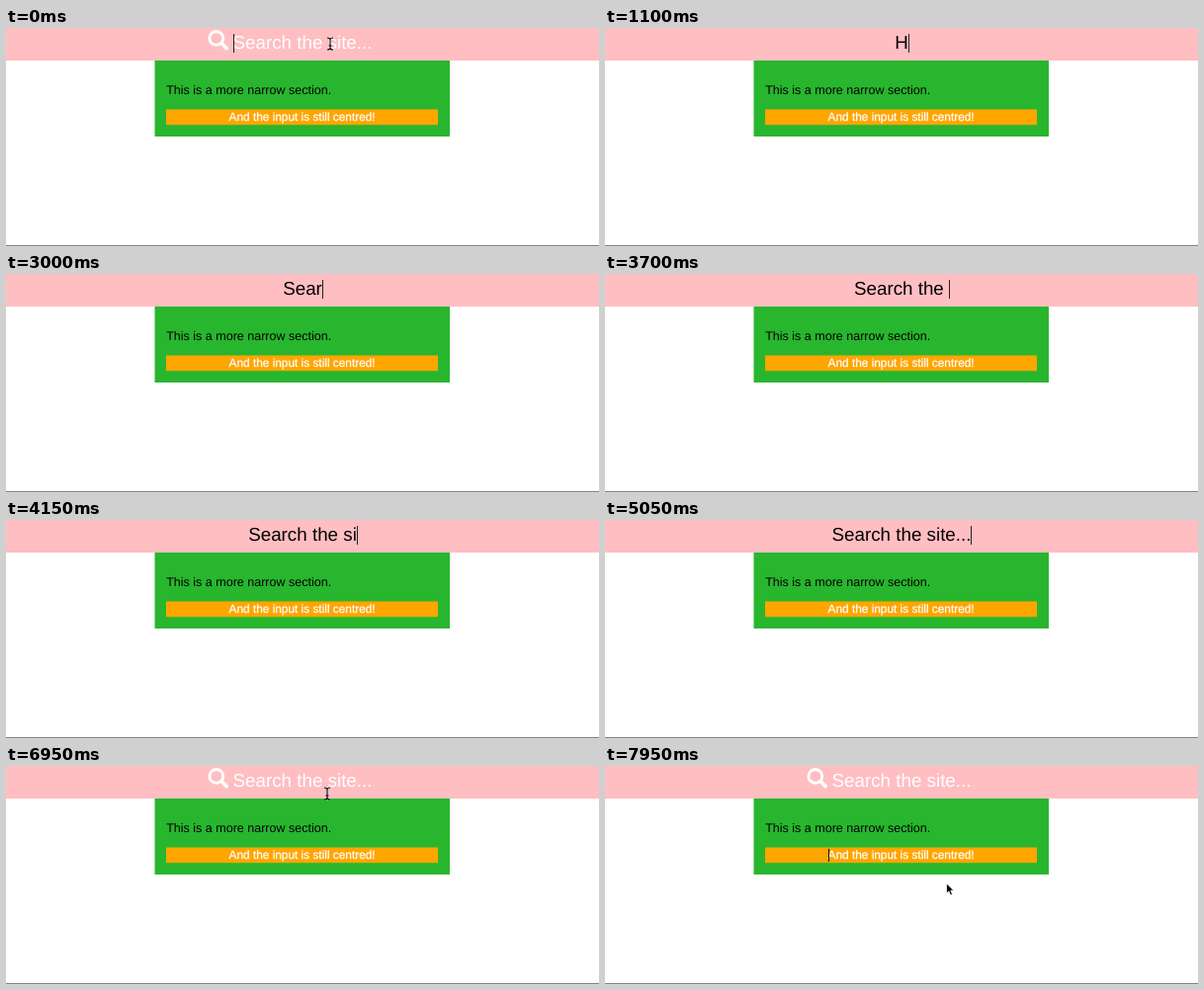
Write an HTML page that moves like this. It is 600x221 px and loops after 8 s.

```html
<!DOCTYPE html>
<html lang="en">
<head>
<meta charset="utf-8">
<title>Centred search input</title>
<style>
  html, body { margin: 0; width: 100%; height: 100%; overflow: hidden; background: #fff; }
  svg { display: block; width: 100vw; height: 100vh; }
  text {
    font-family: "Liberation Sans", Arial, sans-serif;
    text-rendering: geometricPrecision;
    white-space: pre;
  }
  .search { font-size: 18.8px; text-anchor: middle; }
</style>
</head>
<body>
<svg viewBox="0 0 600 221">
  <rect width="600" height="33" fill="#ffbec2"/>
  <rect x="150.5" y="33" width="298.5" height="77" fill="#28b62e"/>
  <rect x="162" y="82.5" width="275" height="15.7" fill="#ffa500"/>
  <rect y="220" width="600" height="1" fill="#858585"/>
  <text x="162.2" y="67" font-size="12.52">This is a more narrow section.</text>
  <text x="299.6" y="94" font-size="11.85" fill="#fff" stroke="#fff" stroke-width=".25" text-anchor="middle">And the input is still centred!</text>

  <g id="hint">
    <g fill="none" stroke="#fff">
      <circle cx="212.8" cy="10.4" r="6.9" stroke-width="2.9"/>
      <path d="M218.3 15.8L223.2 20.6" stroke-width="3.6" stroke-linecap="round"/>
    </g>
    <text class="search" id="placeholder" x="300" y="20.5" fill="#fff">Search the site...</text>
  </g>
  <text class="search" id="typed" x="300" y="20.5"></text>
  <rect id="caret" y="6" width="1" height="19" fill="#222"/>
  <rect id="caret2" x="226" y="84" width="1" height="13" fill="#111"/>

  <g id="beam" fill="none">
    <path d="M-3 -6Q0 -6 0 -4Q0 -6 3 -6M0 -4.5V4.5M-3 6Q0 6 0 4Q0 6 3 6M-1.5 2H1.5" stroke="#fff" stroke-width="2" opacity=".45"/>
    <path d="M-3 -6Q0 -6 0 -4Q0 -6 3 -6M0 -4.5V4.5M-3 6Q0 6 0 4Q0 6 3 6M-1.5 2H1.5" stroke="#000" stroke-width="1.1"/>
  </g>
  <path id="arrow" d="M0 0V10.2L2.4 8L4.1 12.1L6 11.3L4.3 7.3H7.4Z" fill="#000" stroke="#fff" stroke-width=".8"/>
</svg>
<script>
const LOOP = 8000, STEP = 50;
const $ = id => document.getElementById(id);
const FULL = "Search the site...";

// [time, text in the field, caret visible]
const states = [[0, "", 1], [550, "", 0]];
const type = (text, times) =>
  times.forEach((t, i) => states.push([t, text.slice(0, i + 1), 1]));

type("Hello!", [1000, 1150, 1300, 1400, 1550, 1700]);
states.push([2100, "", 1]);
type(FULL, [2450, 2700, 2850, 3000, 3100, 3250, 3350, 3450, 3550, 3600, 3700,
            3900, 4050, 4200, 4300, 4400, 4550, 4700]);
states.push([5150, "", 1], [5650, "", 0], [5800, FULL, 1], [6300, "", 1],
            [6800, "", 0], [7300, "", 1], [7700, "", 0]);

// [time, x, y] of the pointer once it reappears
const path = [[6800, 328, 16], [6950, 325, 28], [7600, 319, 90], [7850, 319, 90],
              [7900, 338, 112], [7950, 345.5, 119]];

function pointerAt(t) {
  if (t < 1000) return [328, 16];
  if (t < path[0][0]) return null;
  const i = path.findIndex(p => p[0] > t);
  if (i < 0) return path[path.length - 1].slice(1);
  const [a, b] = [path[i - 1], path[i]];
  const k = (t - a[0]) / (b[0] - a[0]);
  return [a[1] + (b[1] - a[1]) * k, a[2] + (b[2] - a[2]) * k];
}

const overText = y => y < 33 || (y > 55 && y < 71) || (y > 82 && y < 98);
const show = (el, on) => el.setAttribute("visibility", on ? "visible" : "hidden");

function draw(t) {
  const [, text, caretOn] = states.filter(s => s[0] <= t).pop();
  const typed = $("typed");
  if (typed.textContent !== text) typed.textContent = text;
  show($("hint"), !text);

  const half = (text ? typed : $("placeholder")).getComputedTextLength() / 2;
  $("caret").setAttribute("x", Math.round(300 + (text ? half : -half)));
  show($("caret"), caretOn);
  show($("caret2"), t >= 7700);

  const pos = pointerAt(t);
  show($("beam"), pos && overText(pos[1]));
  show($("arrow"), pos && !overText(pos[1]));
  if (pos) for (const id of ["beam", "arrow"])
    $(id).setAttribute("transform", `translate(${pos})`);
}

const start = performance.now();
function tick(now) {
  const t = Math.max(0, now - start) % LOOP;
  draw(Math.floor(t / STEP) * STEP);
  requestAnimationFrame(tick);
}
draw(0);
requestAnimationFrame(tick);
</script>
</body>
</html>
```
